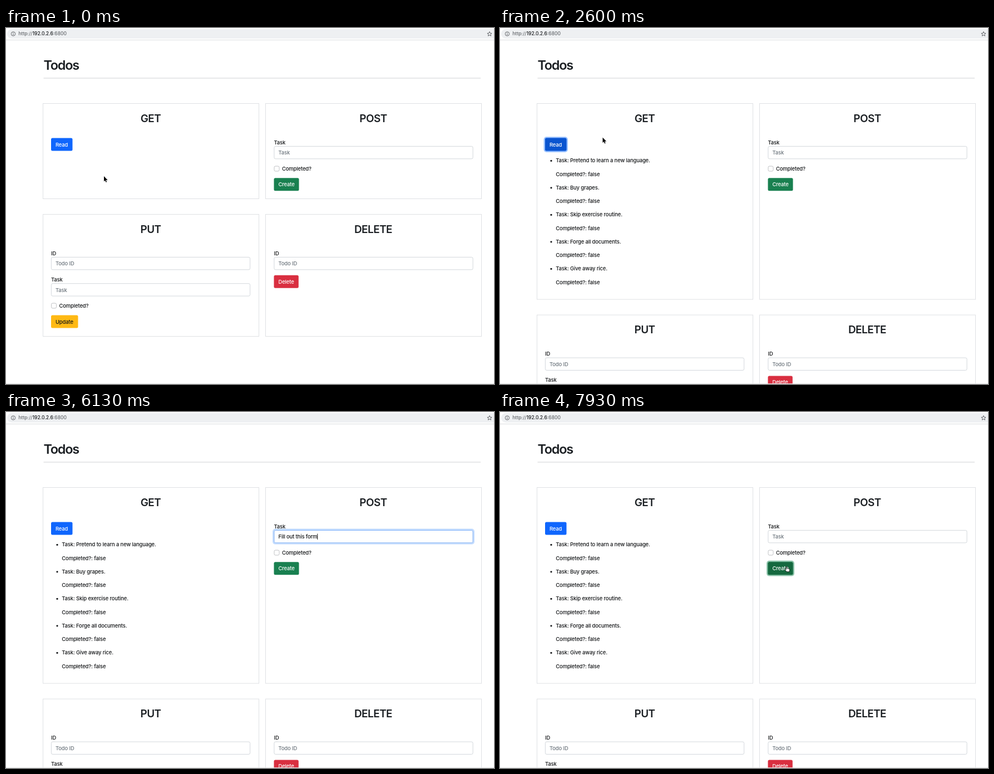
These frames come from a looping animation (877x639 px, 8 s). An HTML page:

```html
<!DOCTYPE html>
<html lang="en">
<head>
<meta charset="utf-8">
<title>Todos</title>
<style>
  html, body { margin: 0; width: 100%; height: 100%; overflow: hidden; background: #fff; }
  svg { display: block; }
  text { font: 500 9.45px Inter, "Open Sans", sans-serif; letter-spacing: -.015em; fill: #121416; white-space: pre; }
  .title { font-size: 23.5px; font-weight: 600; letter-spacing: -.056em; fill: #1b1f23; }
  .head { font-size: 18.9px; font-weight: 600; letter-spacing: -.027em; text-anchor: middle; fill: #1b1f23; }
  .hint { fill: #6c757d; }
  .url { font-size: 8.5px; letter-spacing: 0; fill: #63676b; }
  .host { fill: #17191c; }
  .light { fill: #fff; }
  .card { fill: none; stroke: #dfe1e4; }
  .field { fill: #fff; stroke: #c8ced4; stroke-width: .8; }
  .check { fill: #fff; stroke: #bfc1c4; }
  .cursor { fill: #000; stroke: #fff; stroke-width: 1.3; paint-order: stroke; }
</style>
</head>
<body>
<svg id="stage" width="877" height="639" viewBox="0 0 877 639"></svg>
<script>
const LOOP = 8000, SHIFT = 180.6;
const MESSAGE = "Fill out this form";
const KEY_TIMES = [3930, 4070, 4200, 4270, 4330, 4530, 4800, 4930, 5130,
  5270, 5370, 5480, 5580, 5690, 5790, 5900, 6000, 6130];
const TASKS = ["Pretend to learn a new language.", "Buy grapes.", "Skip exercise routine.",
  "Forge all documents.", "Give away rice."];
// Pointer path: time, x, y
const PATH = [[0, 176, 266], [470, 99, 209], [2530, 99, 209], [2670, 270, 184], [2730, 421, 188],
  [2870, 421, 188], [3130, 540, 197], [3200, 540, 197], [3330, 522, 224], [6530, 522, 224],
  [6600, 527, 225], [6800, 587, 280], [7270, 587, 280], [7470, 522, 277], [7600, 515, 277]];

const text = (x, y, str, cls = "", id = "") => `<text x="${x}" y="${y}" class="${cls}" id="${id}">${str}</text>`;
const rect = (x, y, w, h, r, attrs) => `<rect x="${x}" y="${y}" width="${w}" height="${h}" rx="${r}" ${attrs}/>`;
const card = (x, y, h, name, id = "") =>
  rect(x + .5, y + .5, 388, h, 0, `class="card" id="${id}"`) + text(x + 194, y + 33.8, name, "head");
const field = (x, y, label, hint, id = "") => text(x, y - 3.5, label) +
  rect(x + .4, y + .4, 357.2, 22.4, 2.5, 'class="field"') + text(x + 8, y + 15.4, hint, "hint", id);
const check = (x, y) => rect(x + 1, y + .5, 9, 9, 2.3, 'class="check"') + text(x + 15, y + 8.4, "Completed?");
const button = (x, y, w, label, color, cls = "light") =>
  rect(x, y, w, 23, 2.5, `fill="${color}"`) + text(x + 8, y + 15.1, label, cls);
const ring = (x, y, w, h, color, id) => rect(x - 1.2, y - 1.2, w + 2.4, h + 2.4, 3.7,
  `id="${id}" fill="none" stroke="${color}" stroke-width="2.4"`);
const actionButton = (x, y, w, label, color, dark, glow, id) =>
  ring(x, y, w, 23, glow, id + "Ring") + rect(x, y, w, 23, 2.5, `fill="${color}"`) +
  rect(x, y, w, 23, 2.5, `fill="${dark}" id="${id}Dark"`) + text(x + 8, y + 15.1, label, "light");

const list = TASKS.map((task, i) => {
  const y = 241.3 + i * 48.5;
  return `<circle cx="92" cy="${y - 3}" r="1.6" fill="#121416"/>` +
    text(100.3, y, "Task: " + task) + text(100.3, y + 24.2, "Completed?: false");
}).join("");

const star = Array.from({ length: 10 }, (_, i) => {
  const r = i % 2 ? 1.9 : 4.3, a = i * Math.PI / 5;
  return `${869 + r * Math.sin(a)},${10.8 - r * Math.cos(a)}`;
}).join(" ");

const $ = id => document.getElementById(id);
$("stage").innerHTML = `
  ${rect(2, 2, 900, 17, 8.5, 'fill="#eef0f2"')}
  <path d="M0 21.5H877" stroke="#dcdee1"/>
  <circle cx="13" cy="10.5" r="3.7" fill="none" stroke="#55595d" stroke-width=".9"/>
  <path d="M13 10v2.6M13 8.2v1" stroke="#55595d"/>
  <polygon points="${star}" fill="none" stroke="#55595d" stroke-width=".9"/>
  <text x="22.5" y="13.4" class="url">http://<tspan class="host">192.0.2.6</tspan>:6800</text>
  ${text(67.5, 74.8, "Todos", "title")}
  <path d="M67.5 90H853" stroke="#d0d2d4"/>
  ${card(66, 135, 171, "GET", "getCard")}
  ${actionButton(81, 197.6, 38.5, "Read", "#0f66fd", "#0a55d0", "#98c1fe", "read")}
  <g id="list">${list}</g>
  ${card(466, 135, 171, "POST", "postCard")}
  ${field(481.5, 212, "Task", "Task", "hint")}
  <g id="focus">${ring(481.5, 212, 358, 23.2, "#c2dbfe", "fieldRing")}
    ${rect(481.9, 212.4, 357.2, 22.4, 2.5, 'fill="none" stroke="#86b7fe"')}</g>
  ${text(489.5, 227.4, "", "", "typed")}
  ${rect(0, 218.5, .9, 10.5, 0, 'id="caret"')}
  ${check(481, 247.5)}
  ${actionButton(481.5, 269.2, 45, "Create", "#198050", "#15693f", "#8cc3a9", "create")}
  <g id="lower">
    ${card(66, 334, 219, "PUT")}
    ${field(81, 411, "ID", "Todo ID")}
    ${field(81, 458.3, "Task", "Task")}
    ${check(80.5, 493.5)}
    ${button(81, 515.5, 48.5, "Update", "#ffb914", "")}
    ${card(466, 334, 219, "DELETE")}
    ${field(481.5, 411, "ID", "Todo ID")}
    ${button(481.5, 443.8, 44.3, "Delete", "#d92f40")}
  </g>
  <path d="M0 638.5H877" stroke="#e9eaeb"/>
  <g id="pointer">
    <path id="arrow" class="cursor" d="M0 0V9.6L2.2 7.6 3.6 10.9 5.1 10.2 3.7 7.1H6.7Z"/>
    <path id="beam" d="M-2 -5Q0 -5 0 -3.5Q0 -5 2 -5M0 -4V4M-2 5Q0 5 0 3.5Q0 5 2 5M-1.2 1.5H1.2"
      fill="none" stroke="#222" stroke-width=".9"/>
    <path id="hand" d="M-.8 5.8V1Q0 -.4 .9 1V4Q2 3.2 2.6 4.2Q3.8 3.6 4.2 4.6Q5.8 4.3 5.7 6L5 9.8H.3L-2.8 6.2Q-2.3 4.8 -.8 5.8Z"
      fill="#fff" stroke="#000" stroke-width=".8"/>
  </g>`;

const clamp = v => Math.max(0, Math.min(1, v));
const show = (id, on) => $(id).style.display = on ? "" : "none";
const fade = (id, now, from, to = Infinity) =>
  $(id).style.opacity = clamp((now - from + 80) / 150) - clamp((now - to + 80) / 150);

function pointerAt(now) {
  const next = PATH.findIndex(p => p[0] > now);
  if (next < 0) return PATH[PATH.length - 1].slice(1);
  const [t0, x0, y0] = PATH[next - 1], [t1, x1, y1] = PATH[next];
  const u = (now - t0) / (t1 - t0), k = u * u * (3 - 2 * u);
  return [x0 + (x1 - x0) * k, y0 + (y1 - y0) * k];
}

function draw(now) {
  const loaded = now >= 1000, sent = now >= 7870;
  const shift = loaded ? SHIFT : 0;
  $("getCard").setAttribute("height", 171 + shift);
  $("postCard").setAttribute("height", 171 + shift);
  $("lower").setAttribute("transform", `translate(0 ${shift})`);
  show("list", loaded);

  fade("readDark", now, 400, 3530);
  fade("readRing", now, 800, 3530);
  fade("focus", now, 3530, 7000);
  fade("createDark", now, 7530);
  fade("createRing", now, 7730);

  const count = sent ? 0 : KEY_TIMES.filter(t => t <= now).length;
  $("typed").textContent = MESSAGE.slice(0, count);
  show("hint", !count);
  show("caret", now >= 3530 && now < 7000);
  $("caret").setAttribute("x", 489.5 + (count && $("typed").getComputedTextLength()));

  const [x, y] = pointerAt(now);
  const overField = x > 481 && x < 840 && y > 212 && y < 236;
  const overButton = (x < 119 && y < 221) || now >= 7530;
  $("pointer").setAttribute("transform", `translate(${x} ${y})`);
  show("pointer", now < 3930 || now >= 6600);
  show("beam", overField);
  show("hand", overButton);
  show("arrow", !overField && !overButton);
}

// The picture advances 15 times per second.
function tick() {
  const step = Math.floor(performance.now() % LOOP * .015 + .05);
  draw(Math.round(step / .15) * 10 % LOOP);
  requestAnimationFrame(tick);
}
tick();
</script>
</body>
</html>
```
